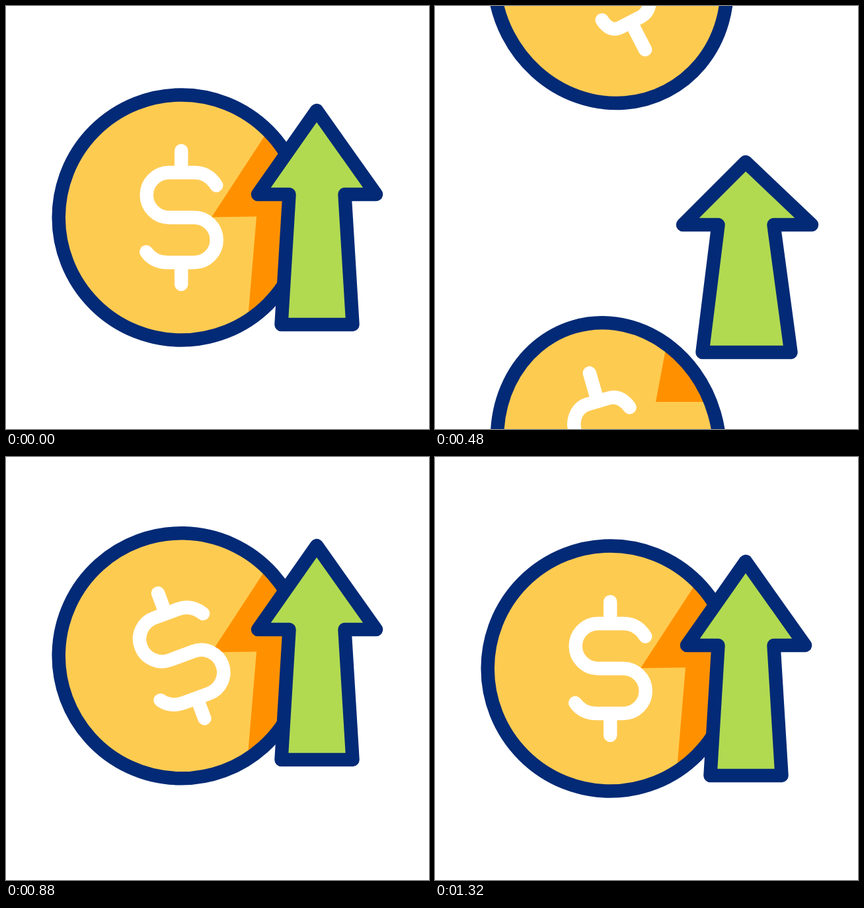
Write an HTML page that moves like this. It is 640 px wide and 640 px high and loops after 1480 ms.

```html
<!DOCTYPE html>
<html lang="en">
<head>
<meta charset="utf-8">
<title>Rising coin</title>
<style>
  html, body { margin: 0; width: 100%; height: 100%; overflow: hidden; background: #fff; }
  svg { display: block; width: 100vw; height: 100vh; }
  .ring, .sign, .arrow { stroke-width: 20.5; stroke-linecap: round; stroke-linejoin: round; }
  .face { fill: #fecb51; }
  .ring { fill: none; stroke: #032a76; }
  .sign { fill: none; stroke: #fff; }
  .arrow { fill: #b1da51; stroke: #032a76; }
  .shade { fill: #ff9100; }
</style>
</head>
<body>
<svg viewBox="0 0 640 640">
  <defs>
    <clipPath id="coins"><ellipse class="disc"/><ellipse class="disc"/></clipPath>
  </defs>
  <ellipse class="face"/><ellipse class="face"/>
  <g clip-path="url(#coins)"><path class="shade"/></g>
  <ellipse class="ring"/><ellipse class="ring"/>
  <path class="sign"/><path class="sign"/>
  <path class="arrow"/>
</svg>
<script>
  const LOOP = 1480, STEP = 40, CX = 265.2, R = 185.5;
  const all = s => [...document.querySelectorAll(s)];
  const discs = all('.disc'), faces = all('.face'), rings = all('.ring'), signs = all('.sign');
  const [shade] = all('.shade'), [arrow] = all('.arrow');

  // Each track is a list of [time, value]; segments ease in and out.
  const leaving = {
    x: [[0, CX]],
    y: [[80, 320], [720, -201]],
    turn: [[80, 0], [720, -40]],
    squeeze: [[80, 1], [320, .91], [720, 1]],
    pull: [[80, 0], [320, .88], [480, 1]]
  };
  const arriving = {
    x: [[480, 262.5], [640, CX]],
    y: [[960, 287.4], [1320, 320]],
    turn: [[260, 0], [740, -37], [1040, 0]],
    squeeze: [[480, .905], [800, 1]],
    pull: [[480, .82], [860, 0]]
  };
  const lift = [[80, 0], [280, -58], [480, 46], [755, -31], [1160, 0]];

  // Arrow poses: head height, body height, x of left, right, foot left, foot right, then shade foot x and drop
  const rest = [127, 197, 381, 560, 416.5, 524.5, 359, 33.5];
  const tall = [138.7, 205.4, 393.3, 546, 421, 522.8, 380, 42];
  const squat = [95, 193, 375, 570, 404.5, 538.5, 334, 28];
  const poses = [[80, rest], [280, tall], [480, squat], [800, rest]];

  const mix = (a, b, k) => Array.isArray(a) ? a.map((v, i) => mix(v, b[i], k)) : a + (b - a) * k;

  function at(track, t) {
    const i = track.findIndex(key => t < key[0]);
    if (i === 0) return track[0][1];
    if (i < 0) return track[track.length - 1][1];
    const [t0, a] = track[i - 1], [t1, b] = track[i], u = (t - t0) / (t1 - t0);
    return mix(a, b, u * u * (3 - 2 * u));
  }

  const poly = points => 'M' + points.map(p => p.join(' ')).join('L') + 'Z';

  // Pulling narrows the S, curls its ends in and lengthens the bars.
  function dollar(pull) {
    const w = 1 - .16 * pull, bar = 101 + 14 * pull, bowl = `A${34 * w} 34 0 0 0`;
    const topX = 53 * w * (1 - .06 * pull), topY = -48.5 * (1 - .07 * pull);
    const lowX = -53 * w * (1 - .16 * pull), lowY = 52 * (1 - .13 * pull);
    return `M${topX} ${topY}Q${41 * w} -68 ${20 * w} -68H${-18.5 * w}${bowl} ${-18.5 * w} 0` +
      `H${19.5 * w}A${34 * w} 34 0 0 1 ${19.5 * w} 68H${-20.5 * w}Q${-42 * w} 68 ${lowX} ${lowY}` +
      `M0 ${-bar}V-68M0 68V${bar}`;
  }

  // A squeezed, tilted ring keeps an even stroke, so only its radii change.
  function drawCoin(i, coin, y, t) {
    const rx = (R + 10) * at(coin.squeeze, t) - 10;
    const place = `translate(${at(coin.x, t)} ${y}) rotate(${at(coin.turn, t)})`;
    for (const el of [discs[i], faces[i], rings[i]]) {
      el.setAttribute('rx', rx);
      el.setAttribute('ry', R);
      el.setAttribute('transform', place);
    }
    signs[i].setAttribute('d', dollar(at(coin.pull, t)));
    signs[i].setAttribute('transform', `translate(${CX} ${y}) rotate(${at(coin.turn, t)})`);
  }

  function drawArrow(t) {
    const [head, body, left, right, footL, footR, shadeFoot, drop] = at(poses, t);
    const y = 285 + at(lift, t), tip = y - head, foot = y + body;
    arrow.setAttribute('d', poly([
      [470, tip], [right, y], [512.5, y], [footR, foot], [footL, foot], [428.5, y], [left, y]
    ]));
    const under = y + drop;
    shade.setAttribute('d', poly([
      [421, tip - 7], [510, under], [463, under], [470, foot + 75],
      [shadeFoot, foot + 75], [379, under], [311 + 1.4 * (left - 381), under + 1]
    ]));
  }

  function draw(t) {
    const rise = t < 960 ? 376 * Math.pow((960 - t) / 480, 1.86) : 0;
    drawCoin(0, leaving, at(leaving.y, t), t);
    drawCoin(1, arriving, at(arriving.y, t) + rise, t);
    drawArrow(t);
  }

  const start = performance.now();
  function tick() {
    const t = (performance.now() - start) % LOOP;
    draw(Math.floor(t / STEP) * STEP);
    requestAnimationFrame(tick);
  }
  tick();
</script>
</body>
</html>
```
